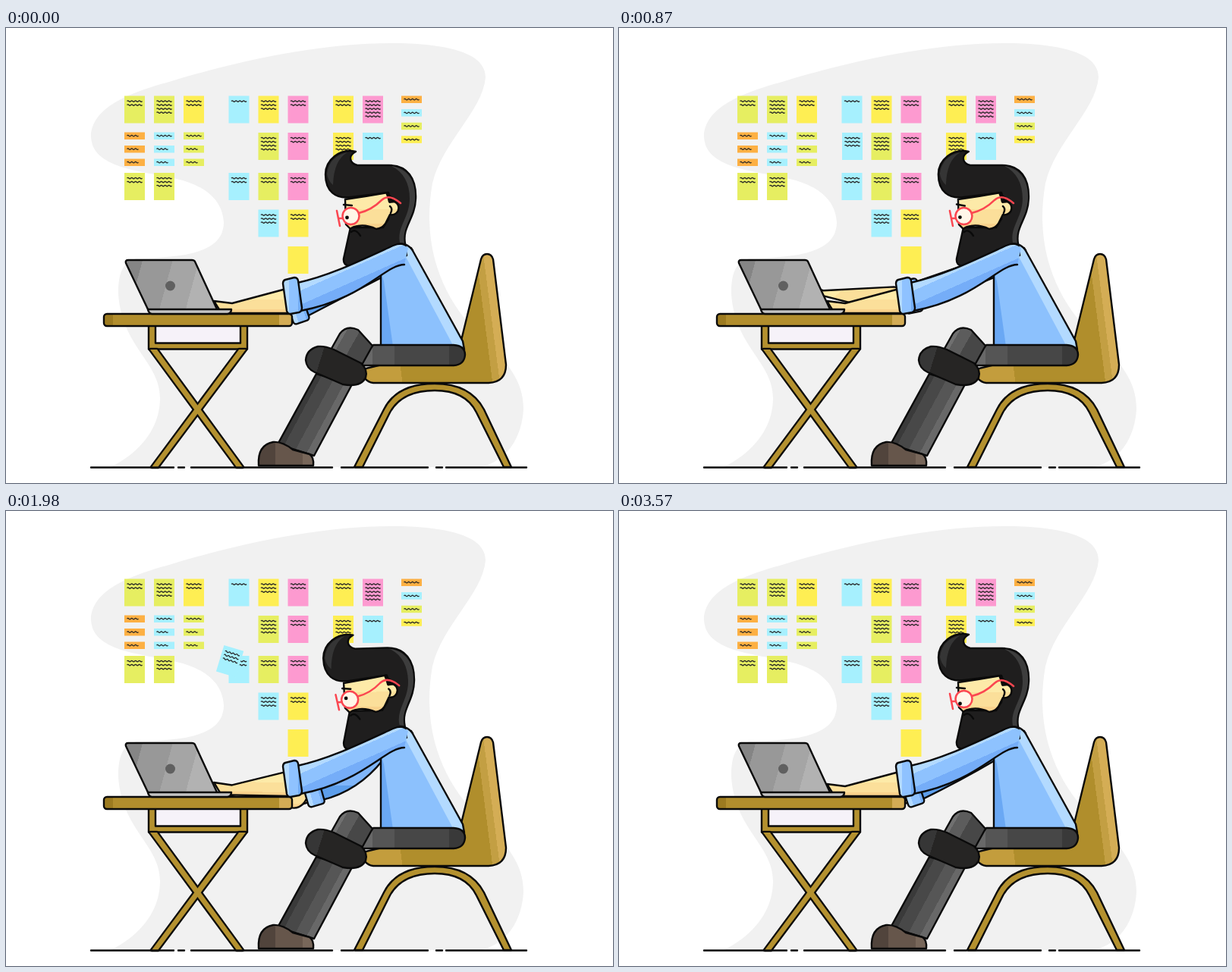
Animation, 800 px wide and 600 px high, one loop 3.6 s. Source, as an HTML page:

```html
<!DOCTYPE html>
<html>
<head>
<meta charset="utf-8">
<title>Desk work</title>
<style>
html, body { margin: 0; width: 100%; height: 100%; overflow: hidden; background: #fff; }
svg { display: block; width: 800px; height: 600px; }
.ink { stroke: #0a0a0a; stroke-width: 2.4; stroke-linejoin: round; stroke-linecap: round; }
.line { fill: none; }
.red { fill: none; stroke: #fb4650; stroke-width: 2.5; stroke-linecap: round; }
.under { fill: #0a0a0a; stroke: #0a0a0a; stroke-width: 4.6; stroke-linejoin: round; }
.wood { fill: #b4912f; }
.skin { fill: url(#skin); }
</style>
</head>
<body>
<svg viewBox="0 0 800 600">
<defs id="defs"></defs>
<path fill="#f1f1f1" d="M138 579C180 558 203 525 203 488C203 440 152 420 148 350C148 325 153 308 172 304C225 302 287 300 287 256C285 222 255 206 225 199C180 188 112 186 112 142C114 105 160 86 215 71C310 42 420 18 520 20C590 22 632 35 632 65C628 110 575 150 562 205C545 300 585 370 630 410C660 440 682 465 682 502C680 545 655 575 622 579Z"/>
<g id="notes"></g>
<g id="moving"></g>

<g id="farArm">
  <path id="sleeve" class="ink" fill="url(#farBlue)"/>
  <rect id="stub" class="ink skin" x="-22" y="-15" width="16" height="30"/>
  <g id="limb">
    <path class="ink skin" d="M9 -14L-67 -68Q-72 -74 -71 -79L-77 -102Q-82 -110 -89 -108Q-96 -105 -94 -98L-86 -82L-93 -86Q-98 -84 -96 -78L-82 -64Q-77 -60 -71 -62L-16 10A17 17 0 0 0 9 -14Z"/>
    <path class="ink line" d="M-86 -82L-82 -77"/>
    <circle r="13.5" fill="#fbdf9a"/>
  </g>
  <rect id="cuff" class="ink" x="-11" y="-22" width="22" height="44" rx="4" fill="url(#cuffBlue)"/>
</g>

<!-- chair -->
<path class="ink" fill="url(#chair)" d="M470 450L598 420L626 305Q628 298 634 298Q640 298 642 305L659 444Q659 467 636 468H484Q470 466 470 450Z"/>
<path class="ink wood" d="M459 579L498 503Q515 469 565 469Q612 469 630 503L666 579H656L620 507Q606 478 565 478Q522 478 506 507L470 579Z"/>

<!-- torso and legs -->
<path fill="#8cc1fd" d="M494 420V322L500 292Q520 276 536 293L602 413L604 424Z"/>
<path fill="#6aa8f4" d="M494 322L498 334L510 420H494Z"/>
<path fill="#b3daff" d="M516 287Q528 283 536 293L604 420H590L526 300Z"/>
<path class="ink line" d="M494 420V326M534 290L602 413L604 424"/>
<path class="ink" fill="url(#thigh)" d="M484 418H590Q605 419 605 431Q604 444 590 445H462Z"/>
<path class="ink" fill="url(#knee)" d="M426 428L440 403Q449 391 464 398L483 419L468 446Z"/>
<path class="ink" fill="url(#shin)" d="M409 456L456 470L406 564L358 549Z"/>
<path class="ink" fill="url(#shoe)" d="M411 420Q396 424 395 438Q396 449 407 454L444 470Q468 474 474 461Q477 450 468 442L432 424Q420 419 411 420Z"/>
<path class="ink" fill="url(#boot)" d="M333 577Q331 550 352 546Q364 545 378 556L400 562Q406 566 405 577Z"/>

<g id="head">
  <path class="ink" fill="#1f1e1e" d="M461 163C440 158 421 174 421 193C421 215 434 226 455 223L504 217L508 229L504 252L497 263L454 263L445 304Q444 313 453 314L528 300L526 284C522 262 539 252 540 225C541 198 529 181 505 181L463 181C452 178 451 168 461 163Z"/>
  <path fill="#3d3d3d" d="M508 182C531 186 540 203 539 225C538 250 521 262 525 284L519 283C515 262 532 250 532 225C532 205 524 190 508 182Z"/>
  <path fill="#353535" d="M423 192Q426 169 450 164Q432 174 431 207Q424 201 423 192Z"/>
  <path class="ink skin" d="M447 226Q475 222 503 217L505 229A9 9 0 1 1 506 246L500 258Q496 264 488 265Q475 259 464 261Q457 262 454 265L448 259Z"/>
  <path fill="#0a0a0a" d="M500 217L512 224L514 230L505 231Z"/>
  <path class="ink line" d="M506 235Q510 238 507 244M455 269Q461 264 467 274"/>
  <circle class="red" cx="454.5" cy="248" r="11" style="fill:#fff6e8"/>
  <circle id="pupil" cx="449.5" r="2.4" fill="#0a0a0a"/>
  <path class="red" d="M436 241L440 261M438 251H444M465 244C478 241 488 234 495 227Q505 218 520 231"/>
  <path id="brow" class="ink line" d="M445 233L456 234"/>
</g>

<!-- table -->
<path d="M197 394H309V416H197Z" fill="#f6f2f9"/>
<path class="ink wood" d="M188 390H197V415.500H309V390H318V423.500H188Z"/>
<g id="legs"></g>
<rect class="ink" x="129" y="377" width="248" height="16" rx="4" fill="url(#top)"/>

<!-- laptop and near arm -->
<path class="ink" fill="url(#screen)" d="M188 373L158 310Q157 306 161 306H245Q248 306 249 308L279 373Z"/>
<circle cx="216.500" cy="340" r="6.500" fill="#606060"/>
<path id="nearHand" class="ink skin" d="M274 360L298 363L369 344L373 376H284Z"/>
<path class="ink" fill="#c4c4c4" d="M187 371H297Q297 376 292 377H192Q188 376 187 371Z"/>
<path fill="url(#nearBlue)" d="M384 336C425 327 460 310 510 287Q520 283 530 290L525 312C500 312 470 358 388 373Z"/>
<path class="ink line" d="M384 336C425 327 460 310 510 287Q526 280 536 293M388 373C470 358 500 312 525 312"/>
<path class="ink" fill="url(#cuffBlue)" d="M368 332L380 329Q384 329 385 333L390 369Q390 374 386 375L375 377Q371 377 370 373L365 337Q365 333 368 332Z"/>
<path class="ink line" d="M112 579.500H221M227 579.500H235M244 579.500H430M442 579.500H458M460 579.500H556M567 579.500H575M580 579.500H686"/>
</svg>

<script>
const $ = id => document.getElementById(id);
const LOOP = 3600, STEP = 30;

// Hard-edged gradient: direction, then pairs of colour and start.
function bands(id, x2, y2, ...stops) {
  let s = '';
  for (let i = 0; i < stops.length; i += 2)
    for (const edge of [stops[i + 1], stops[i + 3] ?? 1])
      s += `<stop offset="${edge}" stop-color="${stops[i]}"/>`;
  $('defs').innerHTML += `<linearGradient id="${id}" x2="${x2}" y2="${y2}">${s}</linearGradient>`;
}
bands('skin', 0, 1, '#fdeaa8', 0, '#fbdf9a', .45, '#f9d28c', .85);
bands('farBlue', 0, 1, '#a9d4ff', 0, '#80b6fa', .4, '#5d9eeb', .78);
bands('nearBlue', .6, .81, '#b3daff', 0, '#8ec2fe', .57, '#75adf8', .74);
bands('cuffBlue', 1, 0, '#b3daff', 0, '#8fc2ff', .3, '#72acf5', .8);
bands('chair', 1, -.116, '#c39d3d', 0, '#b08e2c', .16, '#c39f43', .78, '#d4ad55', .83);
bands('top', 1, 0, '#9d7b20', 0, '#b28e2d', .05, '#d4ac55', .93);
bands('thigh', 1, 0, '#686868', 0, '#555', .15, '#474747', .35, '#393939', .85);
bands('knee', 1, .5, '#707070', 0, '#5c5c5c', .35, '#474747', .6);
bands('shin', .86, .51, '#3a3a3a', 0, '#484848', .52, '#565656', .68, '#686868', .83);
bands('shoe', 1, .2, '#363636', 0, '#262524', .3);
bands('boot', 1, 0, '#51443c', 0, '#66564b', .3, '#78675a', .8);
bands('screen', 1, .15, '#858585', 0, '#989898', .18, '#a5a5a5', .5, '#b2b2b2', .78);

const COLOR = { l: '#e6ee61', y: '#feee53', c: '#a6f0fe', p: '#fd9ad0', o: '#fdb043' };

function note(x, y, color, lines, h = 36, width = 20) {
  let s = `<rect x="${x}" y="${y}" width="27" height="${h}" fill="${COLOR[color]}"/>`;
  const wave = 'q1.25 -1.5 2.5 0t2.5 0'.repeat(Math.round(width / 5));
  for (let i = 0; i < lines; i++)
    s += `<path d="M${x + 3.5} ${y + (h < 20 ? 4.7 : 7) + i * 5}${wave}" fill="none" stroke="#252525" stroke-width="1.25"/>`;
  return s;
}

// Three groups of columns; each note is a colour and a line count.
const rows = ['l2 l4 y2 c1 y3 p2 y2 p5', '- - - - l4 p2 y4 c1', 'l2 l3 - c2 l2 p2', '- - - - c3 y2', '- - - - - y0'];
const colX = i => 156 + Math.floor(i / 3) * 137.5 + i % 3 * 39;
const rowY = r => 89.5 + r * 48.5 + (r > 1 ? 4.5 : 0);
let board = '';
rows.forEach((row, r) => row.split(' ').forEach(([color, lines], i) => {
  if (lines) board += note(colX(i), rowY(r), color, +lines);
}));
for (let r = 0; r < 3; r++)
  [...'ocl'].forEach((c, i) => board += note(colX(i), 137.5 + r * 17.5, c, 1, 9.5, r || !i ? 14 : 19));
[...'ocly'].forEach((c, i) => board += note(521, 89.5 + i * 17.6, c, 1, 9.5));
$('notes').innerHTML = board;
$('moving').innerHTML = note(-13.5, -18, 'c', 3);

const legs = ['M190 424H199L312 579H304Z', 'M316 424H307L192 579H200Z'];
$('legs').innerHTML = ['under', 'wood'].map(c => legs.map(d => `<path class="${c}" d="${d}"/>`).join('')).join('');

const clamp = u => Math.max(0, Math.min(1, u));
const ease = (t, from, to) => { const u = clamp((t - from) / (to - from)); return u * u * (3 - 2 * u); };
function rotate(x, y, deg) {
  const a = deg * Math.PI / 180, c = Math.cos(a), s = Math.sin(a);
  return [x * c - y * s, x * s + y * c];
}
const place = (id, x, y, deg) => $(id).setAttribute('transform', `translate(${x} ${y}) rotate(${deg})`);
const turn = (id, deg, x, y) => $(id).setAttribute('transform', `rotate(${deg} ${x} ${y})`);

function drawArm(t) {
  const slide = ease(t, -130, 0) - ease(t, 850, 1110);
  const lift = ease(t, 0, 470) - ease(t, 480, 1003);
  const cx = 404 - 21 * slide + 14 * lift, cy = 367 - 84 * lift;
  const tilt = -16 - 3 * slide + 44 * lift, bend = -48 + 60 * lift, sag = 15 * (1 - slide);
  const at = (x, y) => rotate(x, y, tilt).map((v, i) => v + (i ? cy : cx));
  const elbow = at(-22, 0), up = at(8, -17), low = at(8, 17);
  $('sleeve').setAttribute('d', `M${up}L515 292L497 328Q${(low[0] + 497 + sag) / 2} ${(low[1] + 328) / 2 + sag} ${low}Z`);
  place('cuff', cx, cy, tilt);
  place('stub', cx, cy, tilt);
  place('limb', ...elbow, bend);
  return { elbow, bend };
}

function drawNote(t, { elbow, bend }) {
  $('moving').style.display = t < 0 || t > 2670 ? 'none' : '';
  if (t < 480) {                        // carried by the hand
    const [x, y] = rotate(-69.5, -118, bend - 12);
    return place('moving', elbow[0] + x, elbow[1] + y, bend - 12);
  }
  const u = clamp((t - 1650) / 1020);   // peels off and sways down behind the laptop
  place('moving', 307.5 - 89.5 * u ** 1.75, 156 + 187 * u ** 1.32, 25 * (1 - u) * Math.sin(1.5 * Math.PI * u));
}

function draw(time) {
  const t = time >= 3450 ? time - LOOP : time;   // the reach begins before the loop point
  drawNote(t, drawArm(t));
  turn('head', -3.3 * ease(t, 840, 1170) + 1.8 * ease(t, 1250, 1600) + 1.5 * ease(t, 1980, 2160), 485, 300);
  $('pupil').setAttribute('cy', 254 - 4 * ease(t, -30, 0) - 5 * ease(t, 0, 90) + 9 * ease(t, 690, 1050)
    - 8 * ease(t, 1260, 1740) + 8 * ease(t, 2010, 2640));
  turn('brow', 20 * (ease(t, 0, 90) - ease(t, 690, 960)), 451, 233.5);
  const typing = t > 1620 && t < 2580 ? Math.sin((t - 1620) * Math.PI / 240) ** 2 : 0;
  turn('nearHand', 1.2 * typing, 372, 360);
}

const start = performance.now();
function frame() {
  const t = (performance.now() - start) % LOOP;
  draw(Math.floor(t / STEP) * STEP);
  requestAnimationFrame(frame);
}
frame();
</script>
</body>
</html>
```
